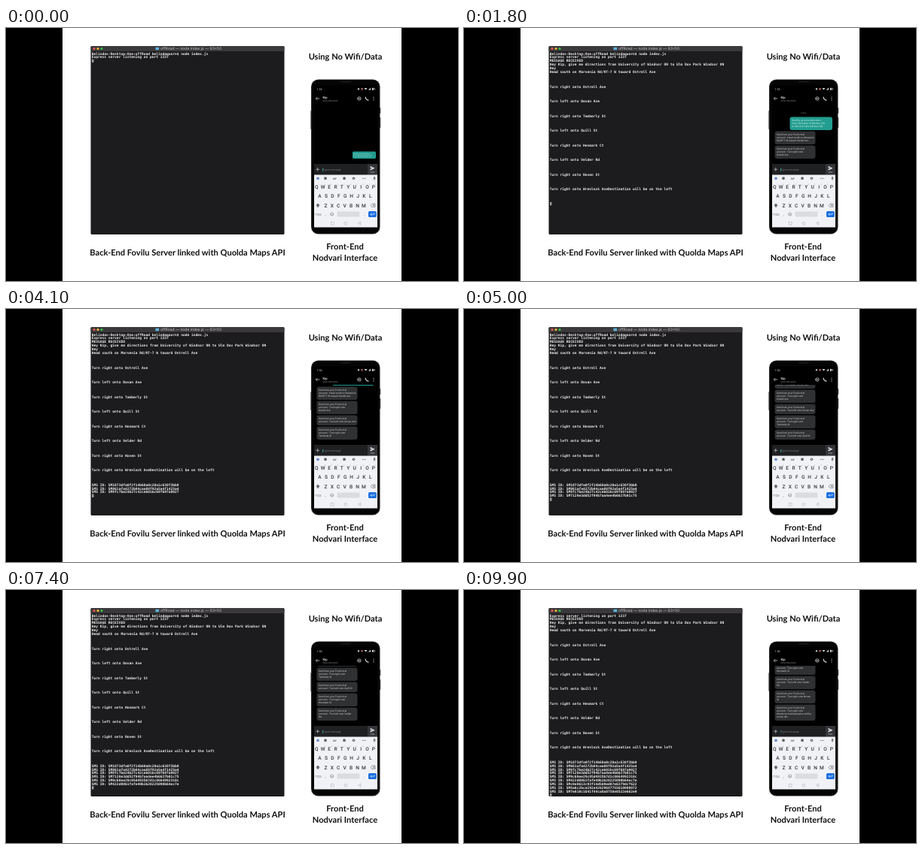
Animation of 600x337 px, one loop 10000 ms. Source, as an HTML page:

```html
<!DOCTYPE html>
<html lang="en">
<head>
<meta charset="utf-8">
<title>Directions over SMS</title>
<style>
  html, body { margin: 0; width: 100%; height: 100%; overflow: hidden; background: #000; }
  svg { display: block; width: 600px; height: 337px; }
  text { text-rendering: geometricPrecision; white-space: pre; }
  .cap { font: 700 11.1px Lato, sans-serif; fill: #111; text-anchor: middle; }
  .term { font: 700 4.585px "DejaVu Sans Mono", monospace; fill: #efefef; }
  .ui { font-family: Roboto, sans-serif; }
  .key { font: 500 6.6px Roboto, sans-serif; fill: #33363b; text-anchor: middle; }
</style>
</head>
<body>
<svg id="stage" viewBox="0 0 600 337">
  <defs>
    <clipPath id="chatClip"><rect x="409" y="101" width="84" height="79"/></clipPath>
  </defs>
</svg>
<script>
const LOOP = 10000, STEP = 100;
const ROW = 4.88, CHAR = 2.76, ROWS = 50;
const stage = document.getElementById('stage');

function el(name, attrs, parent = stage, text) {
  const node = document.createElementNS('http://www.w3.org/2000/svg', name);
  for (const k in attrs) node.setAttribute(k, attrs[k]);
  if (text !== undefined) node.textContent = text;
  parent.appendChild(node);
  return node;
}
const rect = (x, y, width, height, fill, rx = 0, parent) =>
  el('rect', { x, y, width, height, fill, rx }, parent);
const dot = (cx, cy, r, fill, parent) => el('circle', { cx, cy, r, fill }, parent);
const line = (d, stroke, w = 0.7) =>
  el('path', { d, stroke, fill: 'none', 'stroke-width': w, 'stroke-linecap': 'round', 'stroke-linejoin': 'round' });
const label = (x, y, size, fill, text, parent, extra = {}) =>
  el('text', { x, y, 'font-size': size, fill, class: 'ui', ...extra }, parent, text);
const caption = (x, y, text) => el('text', { x, y, class: 'cap' }, stage, text);

// Page
rect(0, 0, 600, 337, '#000');
rect(75, 0, 450, 337, '#fff');
caption(450.5, 41.5, 'Using No Wifi/Data');
caption(241, 302.7, 'Back-End Fovilu Server linked with Quolda Maps API');
caption(450, 295, 'Front-End');
caption(450, 310, 'Nodvari Interface');

// Terminal
const turns = [
  ['right', 'Ostrell Ave'], ['left', 'Dovan Ave'], ['right', 'Tamberly St'],
  ['left', 'Quill St'], ['right', 'Hesmark Ct'], ['left', 'Velder Rd'],
  ['right', 'Noven St'], ['right', 'Wrenlock AveDestination will be on the left']
];
const ids = [
  '1073dfa0f2f14b68a0c20a1c630f3bb0', '861afa4272b04caa88f92a5a4f1425a4',
  '9fc7be24b27c42ceb01bc69f697a9027', '7120e3dd52f94b7aa4ee4b6627b01c75',
  '9c60ee29c05d4935b7d1c8664992310c', '422d0861fafe40b1b28225098b64ec7e',
  'c0e8613c93f14d569ed87e6379dcf622', '5a6c2bca192e42629647755610080072',
  '7e010c1641f44ca8a8758e8522e662e9'
];
const idTimes = [2400, 3000, 3600, 4600, 6000, 6900, 7800, 8900, 9800];
const log = [
  'Belindas-Desktop-One:offRoad belindaquorn$ node index.js',
  'Express server listening on port 1337',
  'MESSAGE RECEIVED',
  'Hey Kip, give me directions from University of Windsor ON to Ulm Dov Park Windsor ON',
  'Hey',
  'Head south on Marvenia Rd/RT-7 W toward Ostrell Ave', '', '', '',
  ...turns.flatMap(([side, road]) => [`Turn ${side} onto ${road}`, '', '', '']),
  ...ids.map(id => 'SMS ID: SM' + id)
];
const logSteps = [[0, 2], [500, 4], [1000, 41], ...idTimes.map((t, i) => [t, 42 + i])];

rect(112.5, 24, 257, 251, '#1c1b1d', 1.5);
rect(112.5, 24, 257, 7, '#3b393c', 1.5);
['#f2584f', '#f5bd2e', '#35c648'].forEach((c, i) => dot(117 + i * 5, 27.5, 1.6, c));
rect(198.5, 25.8, 4.6, 3.5, '#5fb4dc', 0.5);
label(205, 29.3, 5, '#c9c7ca', 'offRoad — node index.js — 93×50', stage,
  { style: 'font-family:Inter,sans-serif' });

const rowY = i => 35.6 + i * ROW;
const rows = el('g', { class: 'term' });
const logLines = log.map((s, i) => el('text', { x: 113.8, y: rowY(i) }, rows, s));
const block = rect(114, 0, CHAR - 0.3, 4.4, '#9b9b9d', 0, rows);

function drawTerminal(t) {
  const shown = logSteps.filter(s => s[0] <= t).pop()[1];
  const scroll = Math.max(0, shown + 1 - ROWS);
  logLines.forEach((n, i) =>
    n.setAttribute('visibility', i < shown && i >= scroll ? 'visible' : 'hidden'));
  block.setAttribute('y', rowY(shown) - 3.8);
  rows.setAttribute('transform', `translate(0 ${-scroll * ROW})`);
}

// Phone body
rect(404.4, 110, 2, 25, '#333', 0.8);
rect(495.4, 106, 1.8, 8, '#333', 0.8);
rect(495.4, 119, 1.8, 14, '#333', 0.8);
rect(405, 68.5, 91.5, 206, '#2c2c2e', 9.5);
rect(405.8, 69.3, 89.9, 204.4, '#050505', 9);
rect(409, 76, 84, 105, '#000', 3);
rect(444, 71.3, 14, 1, '#252527', 0.5);

// Status bar and contact header
const clock = label(412.5, 82.6, 3.7, '#ddd', '');
dot(468, 81.2, 1.2, '#bbb');
rect(471.5, 80, 2, 2.5, '#c96a62', 0.4);
el('path', { d: 'M475.5 80h4l-2 2.6zM481 82.6h3v-3z', fill: '#ddd' });
rect(486, 79.7, 1.8, 3, '#ddd', 0.3);
rect(488.5, 80, 1.3, 2.5, '#999');
line('M416 94h-4.6m1.8-1.8l-1.8 1.8 1.8 1.8', '#ddd');
label(420.6, 93.6, 4.2, '#f2f2f2', 'Kip', stage, { 'font-weight': 500 });
label(420.6, 98.2, 2.9, '#858585', '(000) 000-0000');
line('M466.6 94a2.3 2.3 0 1 0 4.6 0a2.3 2.3 0 1 0-4.6 0', '#d5d5d5');
line('M467.8 94h2.2', '#d5d5d5', 1.2);
line('M477.2 92.2q.4 3.3 3.8 3.9', '#ddd', 1.2);
[92, 94, 96].forEach(y => dot(488, y, 0.6, '#ddd'));

// Chat
const intro = 'Sent from your Fovilu trial';
const chat = [
  [0, 'Hey Kip, give me directions', 'from University of Windsor ON', 'to Ulm Dov Park Windsor ON'],
  [1100, intro, 'account - Head south on Marvenia', 'Rd/RT-7 W toward Ostrell Ave'],
  [1500, intro, 'account - Turn right onto', 'Ostrell Ave'],
  [2500, intro, 'account - Turn left onto Dovan Ave'],
  [3400, intro, 'account - Turn right onto', 'Tamberly St'],
  [4700, intro, 'account - Turn left onto Quill St'],
  [5400, intro, 'account - Turn right onto', 'Hesmark Ct'],
  [6700, intro, 'account - Turn left onto Velder', 'Rd'],
  [7600, intro, 'account - Turn right onto Noven', 'St'],
  [8600, intro, 'account - Turn right onto', 'Wrenlock AveDestination will be', 'on the left']
];
const chatBox = el('g', { 'clip-path': 'url(#chatClip)' });
const bubbles = chat.map(([at, ...lines], i) => {
  const mine = i === 0, h = 5.5 + 4 * lines.length;
  const g = el('g', {}, chatBox);
  const x = mine ? 432.5 : 412.5;
  rect(x, -h, mine ? 56.5 : 54, h, mine ? '#229d90' : '#303133', 3, g);
  lines.forEach((s, n) =>
    label(x + 2.5, -h + 5.8 + n * 4, 3.25, mine ? '#d8f3ef' : '#d2d2d3', s, g));
  return { at, g, mine, pitch: h + 1.5 };
});
const day = label(450.5, -22, 2.8, '#777', 'Today', bubbles[0].g, { 'text-anchor': 'middle' });

const ease = p => 1 - (1 - Math.min(1, Math.max(0, p))) ** 2;

function drawChat(t) {
  let bottom = 174;
  for (let i = bubbles.length - 1; i >= 0; i--) {
    const { at, g, mine, pitch } = bubbles[i];
    if (mine) {
      const p = ease(t / 400), s = 0.55 + 0.45 * p;
      const right = 491 - 2 * p;
      g.setAttribute('transform', `translate(${right - 489 * s} ${bottom}) scale(${s})`);
      day.setAttribute('opacity', p);
    } else {
      const p = ease((t - at) / 200);
      g.setAttribute('transform', `translate(0 ${bottom + pitch * (1 - p)})`);
      g.setAttribute('opacity', p);
      bottom -= pitch * p;
    }
  }
}

// Compose bar
rect(409, 181, 84, 14.5, '#1f2022');
rect(480, 181, 13, 14.5, '#343538');
line('M411.7 188.3h4m-2-2v4', '#ccc');
label(420.8, 189.5, 3.7, '#77787b', 'Type message');
const caret = rect(420, 187, 0.8, 4, '#2bb3a5');
el('path', { d: 'M483.6 184l6 2.8-6 2.8v-2.1l3.6-.7-3.6-.7z', fill: '#f2f2f2' });
label(486.4, 193.2, 2.8, '#bbb', 'SMS', stage, { 'text-anchor': 'middle' });

// Keyboard
rect(409, 195.5, 84, 70, '#f1f2f5');
const ink = '#5f6368';
dot(414, 200.3, 1.9, '#6f8fd0');
rect(422.3, 198.6, 3.4, 3.4, ink, 0.8);
label(436.3, 201.6, 3.4, ink, 'GIF', stage, { 'text-anchor': 'middle', 'font-weight': 700 });
rect(447.4, 198.5, 3.3, 3.6, ink, 0.6);
dot(461.5, 200.3, 1.8, ink);
dot(461.5, 200.3, 0.7, '#f1f2f5');
[473.5, 475.3, 477.1].forEach(x => dot(x, 200.3, 0.6, ink));
rect(488.2, 198, 1.7, 3.2, ink, 0.8);
line('M487.4 200.6q1.6 2.4 3.2 0m-1.6 1.2v.9', ink, 0.5);

[['QWERTYUIOP', 412.2, 213.9], ['ASDFGHJKL', 416.5, 226.3], ['ZXCVBNM', 424.4, 238.6]]
  .forEach(([keys, x, y]) => [...keys].forEach((c, i) =>
    el('text', { x: x + i * 8.42, y, class: 'key' }, stage, c)));
[...'1234567890'].forEach((c, i) => label(414.6 + i * 8.42, 208.6, 2.2, '#8b8e93', c));
el('path', { d: 'M414 233.6l2.8 3h-1.5v2h-2.6v-2h-1.5z', fill: ink });
line('M484.3 236.2l1.7-2.1h4v4.2h-4zm2.9-.9l1.6 1.8m0-1.8l-1.6 1.8', ink, 0.6);
label(414.2, 249.6, 4.2, ink, '?123', stage, { 'text-anchor': 'middle' });
label(424, 250, 5.5, ink, ',', stage, { 'text-anchor': 'middle' });
line('M430.6 248a2.1 2.1 0 1 0 4.2 0a2.1 2.1 0 1 0-4.2 0m1.1.4q1 1.1 2 0', ink, 0.5);
rect(439.5, 244.6, 30, 6.8, '#dadce0', 1.4);
label(475.3, 250, 5.5, ink, '.', stage, { 'text-anchor': 'middle' });
rect(481, 244, 10.8, 8, '#1a6fe0', 1.6);
line('M489 246.5v1.7h-5m1.4-1.4l-1.4 1.4 1.4 1.4', '#fff', 0.6);
line('M431.6 258.4h3.6v3.6h-3.6z', '#a0a3a8', 0.5);
line('M449 260.2a1.9 1.9 0 1 0 3.8 0a1.9 1.9 0 1 0-3.8 0', '#a0a3a8', 0.5);
line('M470.8 258.3v3.8l-3-1.9z', '#a0a3a8', 0.5);

function drawCaret(t) {
  const phase = (t + 100) % 800;
  const fading = phase % 400 < 100;
  caret.setAttribute('opacity', fading ? 0.5 : phase < 400 ? 1 : 0);
}

function render() {
  const t = Math.floor(performance.now() % LOOP / STEP) * STEP;
  drawTerminal(t);
  drawChat(t);
  drawCaret(t);
  clock.textContent = t < 3000 ? '1:55' : '1:56';
  requestAnimationFrame(render);
}
render();
</script>
</body>
</html>
```
